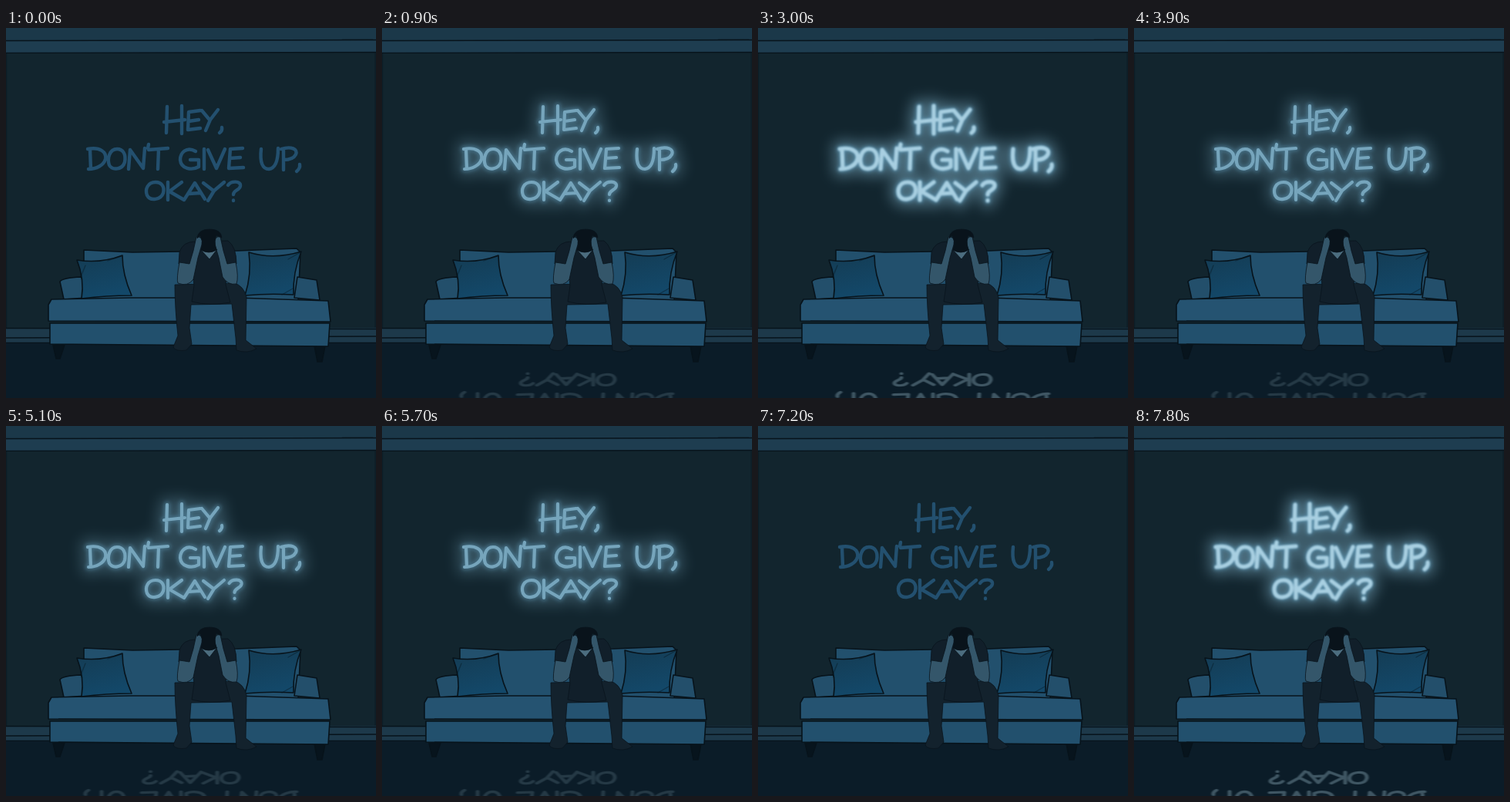
These frames come from a looping animation (480 by 480 pixels, 8 s). An HTML page:

```html
<!DOCTYPE html>
<html lang="en">
<head>
<meta charset="utf-8">
<title>Neon sign</title>
<style>
  html, body { margin: 0; width: 100%; height: 100%; overflow: hidden; background: #12252e; }
  svg { display: block; width: 100vw; height: 100vh; }
  .line { fill: none; stroke: #07131b; stroke-width: 1.3; stroke-linecap: round; }
  .faint { stroke-opacity: .4; }
  .ink { stroke: #07131b; stroke-width: 1.6; stroke-linejoin: round; }
  .sign { fill: none; stroke-linecap: round; stroke-linejoin: round; }
</style>
</head>
<body>
<svg viewBox="0 0 480 480" role="img" aria-label="Hey, don't give up, okay?">
  <defs>
    <linearGradient id="pillow" x2=".3" y2="1">
      <stop stop-color="#143c54"/><stop offset="1" stop-color="#134869"/>
    </linearGradient>
    <g id="words">
      <path d="M209 102L208 136M228 101L228 137M205 122L232 119
        M252 107L237 109L236 132L252 130M237 121L250 119
        M254 107L264 119M275 106L265 119L259 133M280 129Q281 133 277 136"/>
      <path d="M109 158L110 183M106 157C122 154 131 161 129 170C127 178 117 183 107 183
        M144 157C134 157 131 170 134 178C138 185 151 184 154 174C156 164 152 157 144 157
        M159 183L161 158L178 182L180 156M185 151L184 156M185 158L210 156M198 157L197 183
        M246 160C234 153 226 162 226 171C227 183 241 185 250 180L250 171L239 171
        M257 157L257 183M262 158L273 182L284 157
        M307 156L291 157L289 182L308 181M290 169L304 168
        M331 157C329 175 333 183 341 183C350 182 353 170 353 156
        M360 157L360 184M357 157C370 153 379 157 376 164C373 170 364 171 360 171
        M381 177Q382 182 377 186"/>
      <path d="M194 200C184 200 180 209 183 217C187 225 201 223 204 214C206 206 202 200 194 200
        M210 200L210 223M228 200L212 212L231 223M231 223L245 201L258 222M237 215L252 214
        M256 201L269 211M283 200L270 211L262 224"/>
      <path id="query" d="M288 204C292 198 305 198 304 205C303 211 295 210 295 216M295 223.5L295 224"/>
    </g>
  </defs>

  <path fill="#12252e" d="M0 0H480V480H0Z"/>
  <path fill="#1b3849" d="M0 0H480V16H0Z"/>
  <path fill="#1e3d50" d="M0 16H480V32H0Z"/>
  <path class="line" d="M0 16.5L480 15.5M0 32.3L480 31.5M436 15.5H476"/>
  <path class="line faint" d="M.5 33V388M479 33V388"/>
  <path fill="#1d394a" d="M0 389H480V409H0Z"/>
  <path class="line" d="M0 389.5L480 390.5M0 402L480 400M0 408.5H480"/>
  <path fill="#0b1c28" d="M0 409H480V480H0Z"/>

  <g class="ink">
    <path fill="#07141d" d="M61 411L76 411L70 429L65 429ZM400 412L414 412L410 433L404 433Z"/>
    <path fill="#22506d" d="M101 288L164 291L228 290L300 289L377 286L382 291L379 354L101 354Z"/>
    <path fill="#234f6b" d="M70 329Q73 324 98 323L103 350L75 352Z"/>
    <path fill="#234f6b" d="M378 323L403 327L407 353L374 350Z"/>
    <path fill="#255371" d="M59 352L160 350L300 350L418 354L421 381L55 380L55 359Z"/>
    <path fill="#22506d" d="M57 383L420 383L418 413L57 410Z"/>
    <path fill="url(#pillow)" d="M92 301Q122 306 151 295Q151 320 163 347Q130 347 98 351Q102 326 92 301Z"/>
    <path fill="url(#pillow)" d="M315 291Q347 301 383 290Q372 317 373 346Q340 344 310 347Q319 319 315 291Z"/>
  </g>
  <path class="line faint" d="M103 308L97 323M132 302L150 296M358 346L372 338M366 300L382 291"/>

  <g stroke="#0a151d" stroke-width=".8" stroke-linejoin="round">
    <path fill="#13222d" d="M219 333Q219 363 223 399L217 414Q220 420 234 418L241 410L238 389L240 359L293 358L298 402L299 418Q313 423 325 416L311 405L312 349Q308 334 296 331Z"/>
    <path fill="#111f2a" d="M246 277Q229 277 225 291L224 306L241 310L244 334L241 355Q264 361 291 356L285 333L288 308L299 306Q299 284 288 276Z"/>
    <path fill="#34566a" d="M225 304L238 306L243 289L247 271Q256 270 254 281L249 298L243 326Q236 336 223 331Q221 326 225 304Z"/>
    <path fill="#34566a" d="M298 304L287 306L282 289L278 271Q270 269 271 281L276 298L281 323Q288 334 299 332Q302 323 298 304Z"/>
    <path fill="#4c6d7f" d="M252 287Q263 294 274 287L264 300Z"/>
    <path fill="#09131b" d="M248 273Q249 261 264 261Q279 261 280 272L273 269Q269 275 273 288Q263 294 253 288Q257 274 251 269Z"/>
  </g>

  <g id="reflection" class="sign" stroke="#58727f" stroke-width="5" transform="matrix(-1 0 0 -.64 484 591.5)" style="filter:blur(1px)">
    <use href="#words"/>
  </g>
  <g id="halo" class="sign" stroke="#6f9bb0" stroke-width="20" style="filter:blur(9px)"><use href="#words"/></g>
  <g id="glow" class="sign" stroke="#5c97b6" stroke-width="8" style="filter:blur(2.5px)"><use href="#words"/></g>
  <g id="tube" class="sign"><use href="#words"/></g>
</svg>
<script>
  const $ = id => document.getElementById(id);
  const LOOP = 8000, STEP = 300;
  // The sign pulses: off, rising, full, falling.
  const off = { tube: '#23506f', width: 4.4, soft: 0, glow: 0, halo: 0, mirror: 0, shift: 0 };
  const half = { tube: '#76a5bc', width: 4.2, soft: .7, glow: .45, halo: .36, mirror: .34, shift: 0 };
  const full = { tube: '#a8cfe1', width: 5.2, soft: 1, glow: .7, halo: .6, mirror: .68, shift: 3 };
  const pulse = [off, { ...half, shift: 1.5 }, full, half];

  function draw(now) {
    const s = pulse[Math.floor(now % LOOP / STEP) % 4];
    $('tube').style.stroke = s.tube;
    $('tube').style.strokeWidth = s.width;
    $('tube').style.filter = s.soft ? `blur(${s.soft}px)` : 'none';
    $('glow').style.opacity = s.glow;
    $('halo').style.opacity = s.halo;
    $('reflection').style.opacity = s.mirror;
    $('query').setAttribute('transform', `translate(${s.shift})`);
  }

  const start = performance.now();
  function tick() {
    draw(performance.now() - start);
    requestAnimationFrame(tick);
  }
  tick();
</script>
</body>
</html>
```
